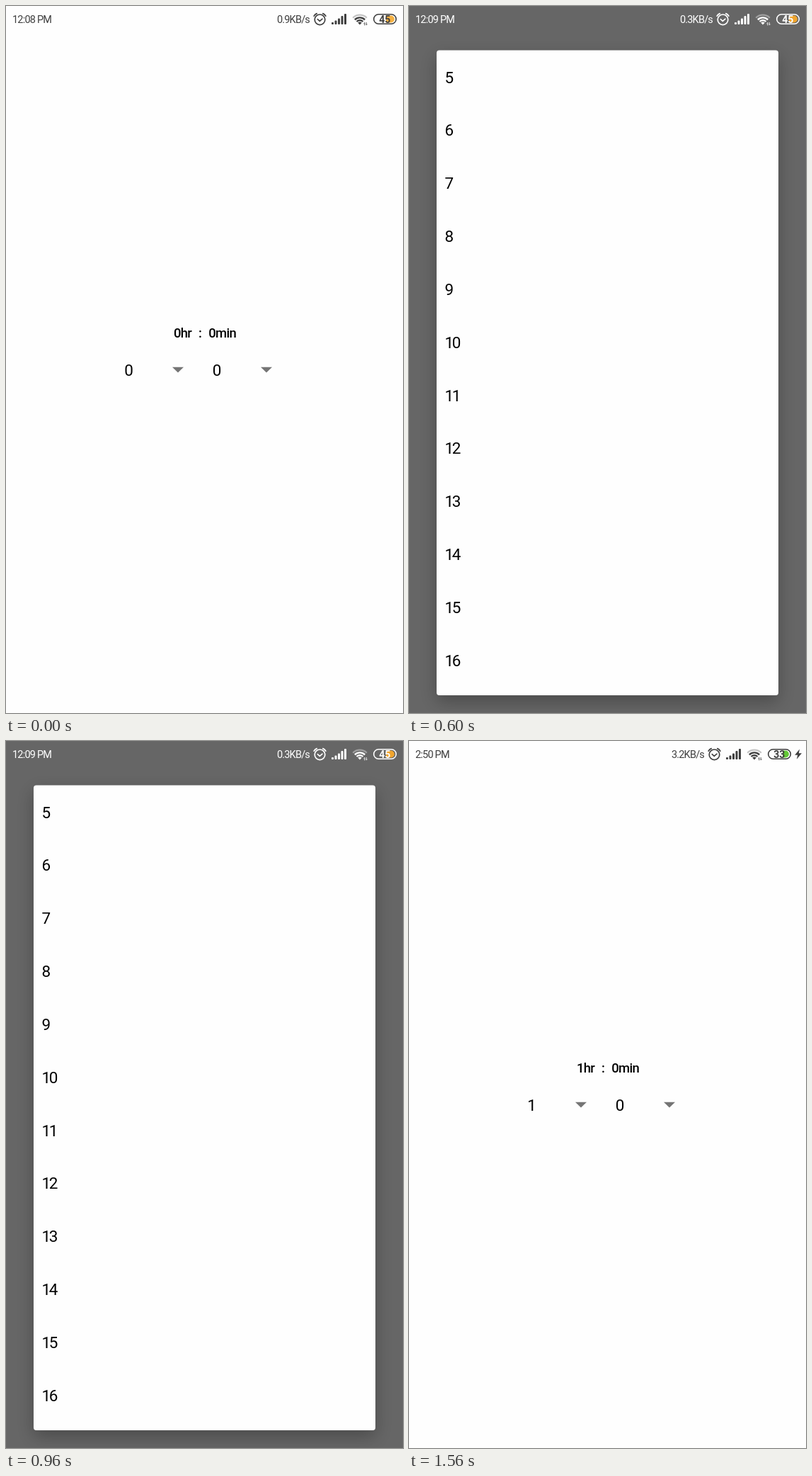
These frames come from a looping animation (561 by 998 pixels, 1800 ms). An HTML page:

```html
<!DOCTYPE html>
<html lang="en">
<head>
<meta charset="utf-8">
<title>Time picker</title>
<style>
  html, body { margin: 0; width: 100%; height: 100%; overflow: hidden; background: #fefefe; }
  svg { display: block; width: 561px; height: 998px; }
  text { font-family: Roboto, "Liberation Sans", sans-serif; }
  .status { font-size: 14.5px; letter-spacing: -.8px; }
  .level { font-size: 14px; font-weight: bold; }
  .total { font-size: 18.5px; font-weight: 500; letter-spacing: -.7px; word-spacing: 6px; }
  .value { font-size: 22.5px; letter-spacing: -2.5px; }
</style>
</head>
<body>
<svg id="stage" viewBox="0 0 561 998" xmlns="http://www.w3.org/2000/svg"></svg>
<script>
const stage = document.getElementById('stage');
const STEP = 600;

const screens = [
  { time: '12:08 PM', rate: '0.9KB/s', level: 45, fill: '#f5b041', hour: 0 },
  { time: '12:09 PM', rate: '0.3KB/s', level: 45, fill: '#f0a52e', list: true },
  { time: '2:50 PM', rate: '3.2KB/s', level: 33, fill: '#62c834', hour: 1, charging: true }
];

const text = (x, y, cls, str, anchor = 'start', fill = '#000') =>
  `<text x="${x}" y="${y}" class="${cls}" text-anchor="${anchor}" fill="${fill}">${str}</text>`;

const rect = (x, y, w, h, r, attrs) =>
  `<rect x="${x}" y="${y}" width="${w}" height="${h}" rx="${r}" ${attrs}/>`;

const line = (d, color, width) =>
  `<path d="${d}" fill="none" stroke="${color}" stroke-width="${width}" stroke-linecap="round" stroke-linejoin="round"/>`;

function alarm(ink) {
  return `<circle cx="443.5" cy="19.3" r="7.3" fill="none" stroke="${ink}" stroke-width="1.7"/>` +
    line('M440.3 18.6L443.3 21.4L447 18.2', ink, 1.6) +
    line('M435.2 14.2Q436.5 11.6 439.2 10.6M451.8 14.2Q450.5 11.6 447.8 10.6', ink, 1.7);
}

function signal(ink) {
  return [3, 5.5, 8.5, 12, 15].map((h, i) =>
    rect(460 + i * 4.5, 26 - h, 3, h, 1, `fill="${ink}"`)).join('');
}

function wifi(ink, faint) {
  const arc = (r, color) => {
    const k = r * .7;
    return `<path d="M${500 - k} ${26.5 - k}A${r} ${r} 0 0 1 ${500 + k} ${26.5 - k}" fill="none" stroke="${color}" stroke-width="2.3"/>`;
  };
  return arc(14, faint) + arc(10.2, ink) + arc(6.4, ink) +
    `<path d="M497.2 23.6Q500 21.6 502.8 23.6L500 26.6Z" fill="${ink}"/>` +
    line('M506.8 27V23.5L505.8 24.5M509.2 23.5V27L510.2 26', ink, .9);
}

function battery(s, ink, paper) {
  const x = 549 - 27 * s.level / 100;
  return rect(519.7, 11.7, 31.6, 13.6, 6.8, `fill="${paper}" stroke="${ink}" stroke-width="1.6"`) +
    `<path d="M${x} 13.6H544A4.9 4.9 0 0 1 544 23.4H${x}Z" fill="${s.fill}"/>` +
    text(535.3, 23.5, 'level', s.level, 'middle', ink);
}

function statusBar(s) {
  const ink = s.list ? '#fff' : '#3f3f3f';
  const faint = s.list ? '#a0a0a0' : '#c4c4c4';
  const shift = s.charging ? -12 : 0;
  return text(9, 24, 'status', s.time, 'start', ink) +
    `<g transform="translate(${shift} 0)">` +
    text(429, 24, 'status', s.rate, 'end', ink) +
    alarm(ink) + signal(ink) + wifi(ink, faint) +
    battery(s, ink, s.list ? '#666' : '#fefefe') + '</g>' +
    (s.charging ? `<path d="M552 11.5L545.2 19.8H549.2L547.8 25.8L555 17.2H550.8Z" fill="${ink}"/>` : '');
}

function picker(hour) {
  const caret = x => `<path d="M${x} 509.7H${x + 16}L${x + 8} 517.6Z" fill="#757575"/>`;
  return text(281, 468, 'total', `${hour}hr : 0min`, 'middle') +
    text(167.2, 522, 'value', hour) + caret(235) +
    text(291.7, 522, 'value', 0) + caret(360);
}

function dropdown() {
  let out = rect(39, 62.5, 483, 910.5, 4, 'fill="#fefefe" filter="url(#shade)"');
  for (let i = 0; i < 12; i++) out += text(50.5, 108.5 + i * 74.85, 'value', i + 5);
  return out;
}

const defs = `<defs><filter id="shade" x="-20%" y="-10%" width="140%" height="120%">
  <feDropShadow dx="0" dy="9" stdDeviation="12" flood-color="#000" flood-opacity=".27"/>
</filter></defs>`;

function render(s) {
  stage.innerHTML = defs +
    rect(0, 0, 561, 998, 0, `fill="${s.list ? '#666' : '#fefefe'}"`) +
    (s.list ? dropdown() : picker(s.hour)) + statusBar(s);
}

let shown = -1;
function tick() {
  const i = Math.floor(performance.now() / STEP) % screens.length;
  if (i !== shown) render(screens[shown = i]);
  requestAnimationFrame(tick);
}
tick();
</script>
</body>
</html>
```
